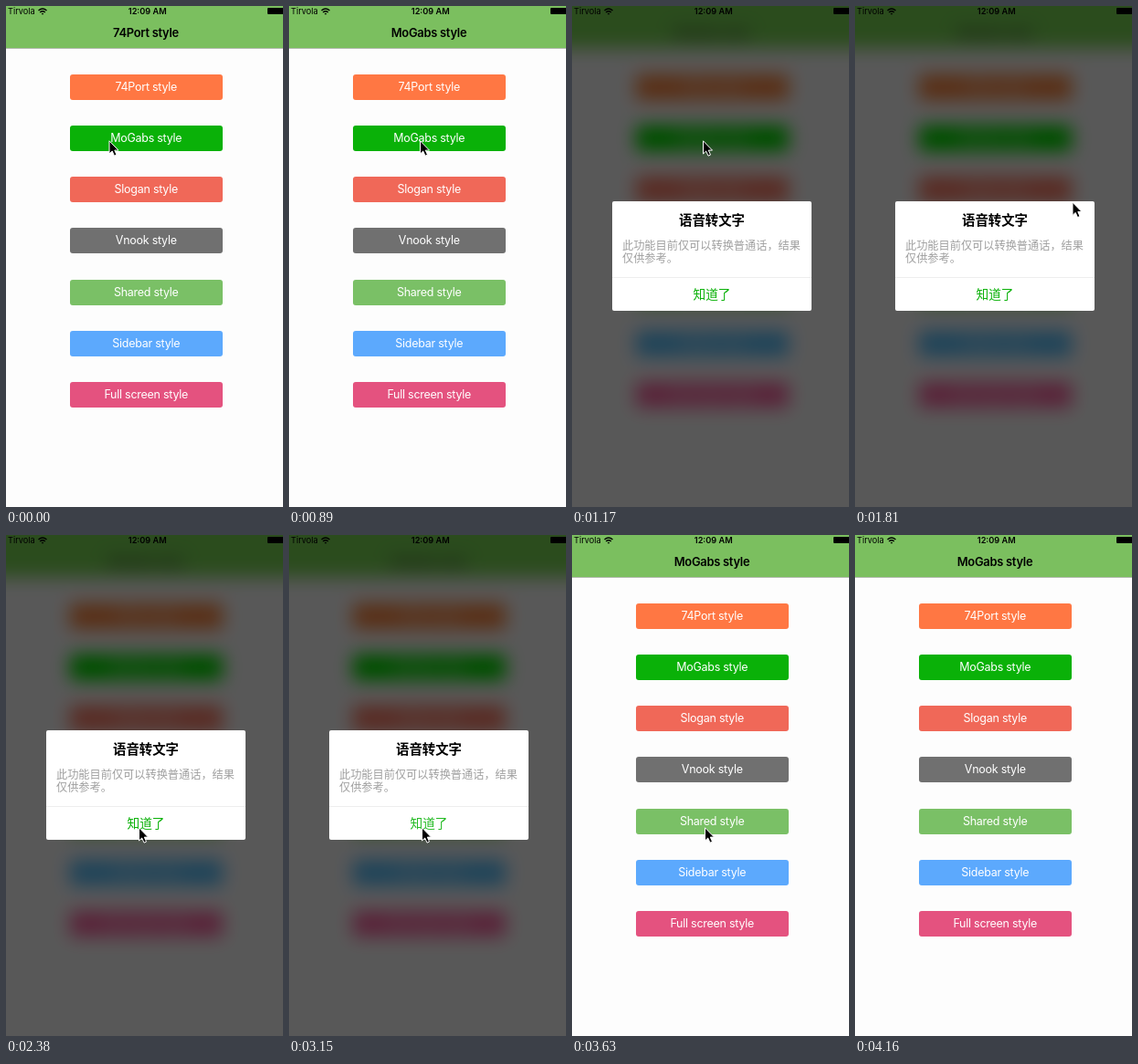
Write an HTML page that moves like this. It is 303 by 549 pixels and loops after 4850 ms.

```html
<!DOCTYPE html>
<html lang="en">
<head>
<meta charset="utf-8">
<title>Dialog styles</title>
<style>
html, body { margin: 0; width: 100%; height: 100%; overflow: hidden; background: #fdfdfd; }
body { position: relative; font-family: Inter, Roboto, sans-serif; }
#stage { position: absolute; left: 0; top: 0; width: 303px; height: 549px; overflow: hidden; }
.page { position: absolute; left: 0; top: 0; width: 303px; height: 549px; }
.nav { position: absolute; left: -60px; right: -60px; top: -60px; height: 105.5px;
  background: #7bbf5f; border-bottom: .8px solid #b4bbb0; }
.title { position: absolute; left: 0; width: 306px; top: 20px; line-height: 20px; text-align: center;
  font-size: 12.9px; font-weight: 600; letter-spacing: -.02em; color: #000; }
.btn { position: absolute; left: 70px; width: 166.5px; height: 28px; line-height: 28px; border-radius: 3px;
  text-align: center; color: #fff; font-size: 12.5px; letter-spacing: -.02em; }
#veil, #shade { position: absolute; inset: 0; }
#blur { position: absolute; inset: -60px; background: #fdfdfd; filter: url(#frost); }
#blur .page { left: 60px; top: 60px; }
#shade { background: #000; }
#card { position: absolute; left: 44px; top: 214px; width: 218px; height: 120px;
  font-family: "Noto Sans CJK SC", "Noto Sans CJK", sans-serif; }
#card div { position: absolute; left: 0; width: 100%; text-align: center; white-space: nowrap; }
#card .paper { top: 0; height: 100%; border-radius: 2px; background: #fff; }
#card .head { top: 9.5px; line-height: 20px; font-size: 14.4px; font-weight: 700; color: #000; }
#card .text { left: 11px; top: 40.5px; line-height: 14px; font-size: 12.2px; text-align: left; color: #9f9f9f; }
#card .rule { top: 83px; height: 1px; background: #eee; }
#card .ok { top: 90.5px; line-height: 20px; font-size: 13.7px; }
.status { position: absolute; top: 0; line-height: 12px; font-size: 9.2px; color: #000; white-space: nowrap; }
svg { position: absolute; overflow: visible; }
</style>
</head>
<body>
<div id="stage">
  <svg width="0" height="0">
    <!-- blur, more saturation, a light white tint -->
    <filter id="frost" x="0" y="0" width="1" height="1" color-interpolation-filters="sRGB">
      <feGaussianBlur stdDeviation="10"/>
      <feColorMatrix values="1.271 -.446 -.045 0 .22  -.133 .958 -.045 0 .22  -.133 -.446 1.359 0 .22  0 0 0 1 0"/>
    </filter>
  </svg>
  <div class="page"></div>
  <div id="veil"><div id="blur"><div class="page"></div></div></div>
  <div id="shade"></div>
  <div id="card" lang="zh-CN">
    <div class="paper"></div>
    <div class="ink head">语音转文字</div>
    <div class="ink text">此功能目前仅可以转换普通话，结果<br>仅供参考。</div>
    <div class="ink rule"></div>
    <div class="ink ok">知道了</div>
  </div>
  <div class="status" style="left:2px">Tirvola</div>
  <svg style="left:35px;top:1.5px" width="10" height="8" viewBox="0 0 10 8" fill="none" stroke="#000" stroke-width="1.4">
    <path d="M.5 3Q5-1 9.5 3M2.2 4.9Q5 2.4 7.8 4.9"/><path d="M3.7 6.2Q5 5.1 6.3 6.2L5 7.7Z" fill="#000" stroke="none"/>
  </svg>
  <div class="status" style="left:0;width:309.5px;text-align:center;font-weight:600">12:09 AM</div>
  <svg style="left:286px;top:2px" width="20" height="8"><rect width="20" height="7" rx="1"/></svg>
  <svg id="cursor" style="left:0;top:0" width="12" height="18">
    <path d="M1 .8V15L4.2 12L6.5 17.2L9 16.1L6.8 11.1H11Z" fill="#000" stroke="#fff" stroke-width="1" stroke-linejoin="round"/>
  </svg>
</div>
<script>
const LOOP = 4850, TICK = 57;
const BUTTONS = [
  ['74Port', '#ff7743'], ['MoGabs', '#0ab108'], ['Slogan', '#f06858'], ['Vnook', '#707070'],
  ['Shared', '#7ac066'], ['Sidebar', '#5ca9fd'], ['Full screen', '#e4527f']
];
// Where the cursor rests, and the moves between those places
const HOME = [112, 147], OPEN = [142.5, 147], TURN = [214, 285], CLOSE = [144.5, 320], AWAY = [278, 527];
const MOVES = [
  { start: 60, end: 230, path: [HOME, OPEN], ease: u => u * u * (3 - 2 * u) },
  { start: 1520, end: 2030, path: [OPEN, [200, 150], [308, 270], TURN], ease: u => u ** 1.3 },
  { start: 2090, end: 2380, path: [TURN, [175, 312], CLOSE], ease: u => 1 - (1 - u) ** 1.6 },
  { start: 3930, end: 4100, path: [CLOSE, AWAY], ease: u => u ** 1.3 }
];
const $ = s => document.querySelector(s);

for (const page of document.querySelectorAll('.page')) {
  page.innerHTML = '<div class="nav"></div><div class="title"></div>' + BUTTONS.map(([name, color], i) =>
    `<div class="btn" style="top:${(74.5 + 56.3 * i).toFixed(1)}px;background:${color}">${name} style</div>`).join('');
}
const titles = document.querySelectorAll('.title'), inks = document.querySelectorAll('.ink');
const veil = $('#veil'), shade = $('#shade'), paper = $('.paper'), ok = $('.ok'), cursor = $('#cursor');

// Progress 0..1 in even jumps; the first jump is at start, the last at end
function stepped(t, start, end) {
  if (t < start) return 0;
  const gaps = Math.round((end - start) / TICK);
  const done = Math.floor((t - start) / (end - start) * gaps + .05);
  return Math.min(1, (done + 1) / (gaps + 1));
}

function bezier(pts, u) {
  if (pts.length === 1) return pts[0];
  return bezier(pts.slice(1).map((p, i) => p.map((v, a) => pts[i][a] + (v - pts[i][a]) * u)), u);
}

function draw(t) {
  const name = BUTTONS[t < 890 ? 0 : 1][0] + ' style';
  titles.forEach(el => { if (el.textContent !== name) el.textContent = name; });

  const shown = stepped(t, 950, 1170) ** 1.36 - stepped(t, 3450, 3630) ** 1.8;
  veil.style.opacity = shown;
  shade.style.opacity = .65 * shown;
  paper.style.opacity = 1 - (1 - shown) ** 1.9;
  inks.forEach(el => { el.style.opacity = shown; });
  ok.style.color = t >= 3150 ? '#22ba22' : '#0ab108';

  const move = MOVES.filter(m => m.start <= t).pop() || MOVES[0];
  const [x, y] = bezier(move.path, move.ease(stepped(t, move.start, move.end)));
  cursor.style.transform = `translate(${x.toFixed(1)}px, ${y.toFixed(1)}px)`;
  cursor.style.visibility = t < 4160 ? 'visible' : 'hidden';
}

const began = performance.now();
function tick() {
  draw((performance.now() - began) % LOOP);
  requestAnimationFrame(tick);
}
tick();
</script>
</body>
</html>
```
